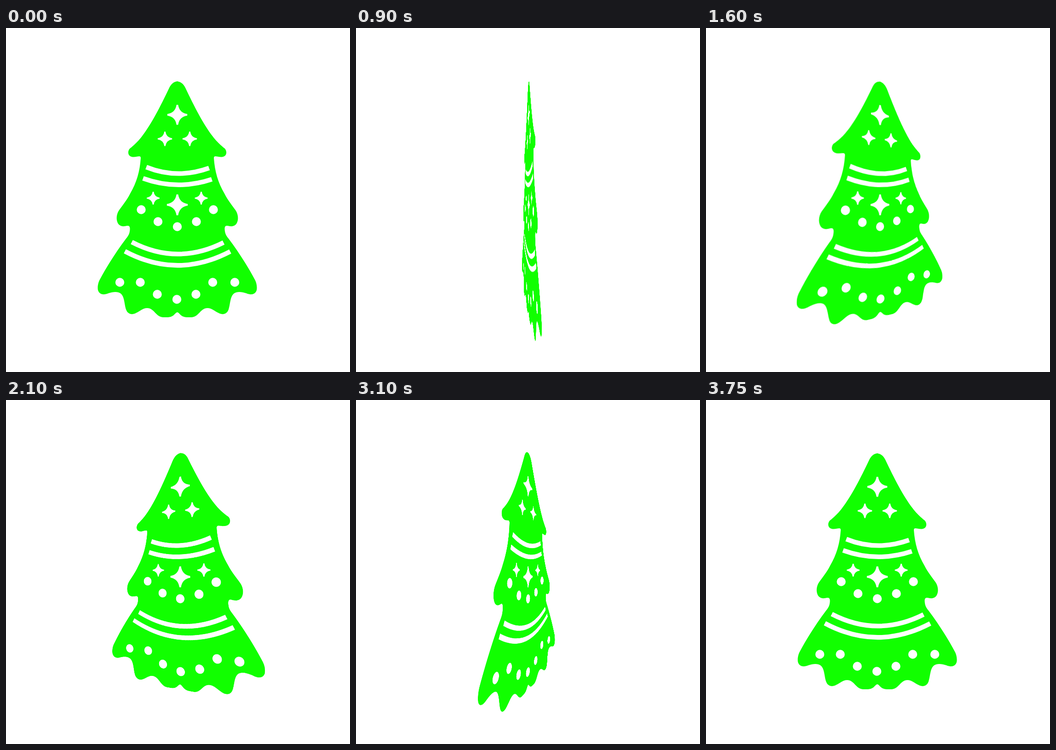
An HTML page for the animation above (3.8 s loop, 748 by 748 pixels).

```html
<!DOCTYPE html>
<html lang="en">
<head>
<meta charset="utf-8">
<title>Turning tree</title>
<style>
  html, body { margin: 0; width: 100%; height: 100%; overflow: hidden; background: #fff; }
  svg { display: block; width: 748px; height: 748px; transform-origin: 375.7px 374.7px; }
</style>
</head>
<body>
<svg id="tree" viewBox="0 0 748 748" fill="#fff">
  <defs>
    <path id="star" d="M-.08-1Q-.2-.2-1-.08V.08Q-.2.2-.08 1H.08Q.2.2 1 .08V-.08Q.2-.2.08-1Z"/>
  </defs>
  <g fill="#11ff00">
    <path id="half" d="M374 116C365 116 359 122 355 130C336 170 316 209 296 235
      C287 247 279 254 272 260C265 264 264 274 269 278C276 283 284 279 290 279Q293 279 293 283
      C291 312 284 336 270 360C263 374 253 386 246 396C239 406 239 420 245 427
      C251 433 258 431 264 430C270 429 270 436 269 442C268 449 265 453 261 458
      C239 487 219 519 204 547C199 556 199 566 200 570C203 580 213 581 222 577
      C234 573 243 573 249 577C258 584 257 600 261 612C264 621 272 624 280 621
      C290 617 297 609 307 609C322 609 326 628 341 629H350C366 629 366 620 372.5 618H374Z"/>
    <use href="#half" transform="matrix(-1 0 0 1 745 0)"/>
  </g>
  <g fill="none" stroke="#fff">
    <path stroke-width="10" d="M305 302.5Q372.5 329.5 441.5 304.5M298 327Q372.5 354 447.5 329
      M273.5 465.5Q372.5 517 473 466.5M258.5 485.5Q372.5 546.5 487.5 486"/>
    <path stroke-width="19.4" stroke-linecap="round" d="M294 395h0M330.5 421h0M372.5 432h0M414 421h0M451 395h0
      M247.5 553h0M292 553h0M329 579h0M371.5 590h0M413 579h0M449.5 553h0M497.5 553h0"/>
  </g>
  <use href="#star" transform="translate(372.5 188.7) scale(21.7)"/>
  <use href="#star" transform="translate(345.5 241) scale(15.7)"/>
  <use href="#star" transform="translate(399.5 241) scale(15.7)"/>
  <use href="#star" transform="translate(320 370) scale(14)"/>
  <use href="#star" transform="translate(424.5 370) scale(14)"/>
  <use href="#star" transform="translate(372.5 384.5) scale(22.7)"/>
</svg>
<script>
  const LOOP = 3800, TICK = 50, POSES = 56;
  const tree = document.getElementById('tree');

  // Three poses per four ticks: the first pose of each group is held twice as long.
  function poseAt(ms) {
    const tick = Math.floor(ms % LOOP / TICK);
    return 3 * Math.floor(tick / 4) + Math.max(0, tick % 4 - 1);
  }

  function draw(now) {
    const angle = -360 * poseAt(now) / POSES;
    tree.style.transform = `perspective(515px) rotateY(${angle}deg)`;
    requestAnimationFrame(draw);
  }
  draw(performance.now());
</script>
</body>
</html>
```
